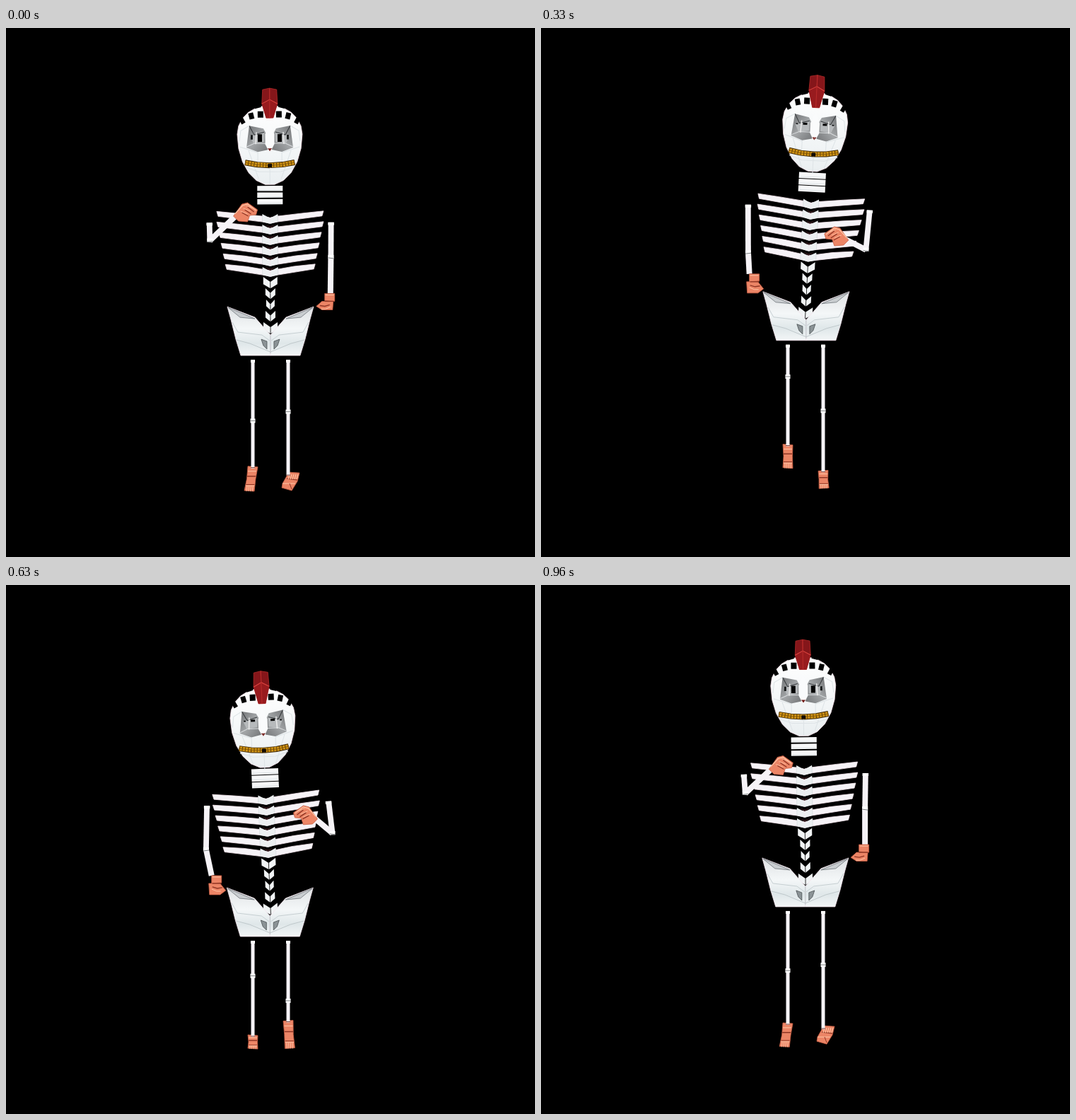
These frames come from a looping animation (748x748 px, 1 s). An HTML page:

```html
<!DOCTYPE html>
<html lang="en">
<head>
<meta charset="utf-8">
<title>Running skeleton</title>
<style>
  html, body { margin: 0; width: 100%; height: 100%; overflow: hidden; background: #000; }
  svg { display: block; width: 100%; height: 100%; }
</style>
</head>
<body>
<svg viewBox="0 0 748 748">
  <defs>
    <linearGradient id="hip" x1="0" x2="0" y1="0" y2="1">
      <stop offset="0" stop-color="#dfe2e4"/><stop offset=".45" stop-color="#f4f7f8"/>
      <stop offset=".75" stop-color="#dfe7e9"/><stop offset="1" stop-color="#f3f6f7"/>
    </linearGradient>
    <linearGradient id="skull" x1="0" x2="0" y1="0" y2="1">
      <stop offset="0" stop-color="#fff"/><stop offset="1" stop-color="#eaeff1"/>
    </linearGradient>
    <linearGradient id="eye" x1="0" x2="1" y1="0" y2="1">
      <stop offset="0" stop-color="#6f7173"/><stop offset=".5" stop-color="#a2a5a7"/>
      <stop offset="1" stop-color="#737577"/>
    </linearGradient>
  </defs>
  <rect width="748" height="748" fill="#000"/>
  <g id="figure"></g>
</svg>
<script>
const figure = document.getElementById('figure');
const MID = 374, GROUND = 463, FRAMES = 24;
const BONE = '#f6f3f7', RIM = '#f3e4ec', FACET = '#dde3e6';
const SKIN = '#ec8566', EDGE = '#c75f45', SHADE = '#8e3524', GLOW = '#ffc6a6';
const { sin, cos, max, min, PI } = Math;

// Sum of harmonics, each given as [cosine, sine] amplitudes
const wave = (mean, ...parts) => a =>
  parts.reduce((sum, [c, s], i) => sum + c * cos((i + 1) * a) + s * sin((i + 1) * a), mean);

const hipY = a => 467 + 30 * sin(2 * a);
const lean = a => 3.3 * sin(a);
const nod = a => min(1, 2 * sin(a) ** 2);

// Left limbs; the right ones are mirrored half a stride later
const upperArm = wave(53, [-12, 0], [-16, 0]);
const elbowX = wave(288, [0, 2.5], [0, -3.3]);
const reachX = wave(16.5, [18, -5.5], [2.5, 0]);
const reachY = wave(8, [-43.5, 2]);
const kneeDrop = wave(77, [15.5, -9.6], [8.5, -3.5], [-7.5, 12]);
const ankleY = wave(618, [-2.4, -18], [8, 8], [-3.6, 2.5]);
const footLength = wave(30, [6, 8]);

const num = v => +v.toFixed(2);
const path = (pts, attrs, close = 'Z') => `<path d="M${pts.map(num).join(' ')}${close}" ${attrs}/>`;
const poly = (pts, fill, stroke = 'none') => path(pts, `fill="${fill}" stroke="${stroke}" stroke-width=".8"`);
const line = (pts, color, width = 1) => path(pts, `fill="none" stroke="${color}" stroke-width="${width}"`, '');
const group = (transform, body) => `<g transform="${transform}">${body}</g>`;
const shift = (x, y, body) => group(`translate(${num(x)} ${num(y)})`, body);
const box = (x, y, w, h, fill) => poly([x, y, x + w, y, x + w, y + h, x, y + h], fill);
const both = body => body + group('translate(748) scale(-1 1)', body);
const repeat = (n, part) => Array.from({ length: n }, (_, i) => part(i)).join('');

const neck = k => repeat(3, i => {
  const y = 223 + i * 9.4;
  return box(356 - k, y, 36 + 2 * k, 7.4 + k, '#f6f7f8') + line([357, y + 6, 391, y + 6], FACET);
});

const ribs = () => repeat(6, i => {
  const y = 259 + i * 15, x = 298.5 + 3 * max(0, i - 1);
  const half = poly([x, y, x + 30, y + 3, 363, y + 7, MID, y + 9, MID, y + 17, 363, y + 15, x + 2, y + 7], BONE, RIM)
    + poly([363, y + 4, MID, y + 10, MID, y + 18, 363, y + 15], '#eceff1')
    + line([363, y + 6, 363, y + 15], '#d5dadd', .7)
    + poly([366, y + 4, MID, y + 6.5, MID, y + 9], i ? '#33191c' : '#000');
  return both(half);
});

const spine = () => both(repeat(5, i => {
  const y = 352 + 16 * i, w = 6 + (i - 2) ** 2, h = 12 + .4 * w, x = MID - w, inner = MID - .4;
  return poly([x, y, inner, y + h * .42, inner, y + h, x, y + h * .64], '#f1f4f5');
}));

function eye(k) {
  const open = 11 - 8 * k;
  return poly([345, 138, 365, 142, 371, 153, 371, 172, 357, 175, 341, 169], 'url(#eye)')
    + poly([346, 152, 366, 148, 366, 161, 351, 163], '#b7babc')
    + line([345, 138, 352, 151, 366, 147], '#34373a')
    + line([341, 168, 352, 163, 368, 163], '#d9dcde')
    + box(357, 150, 6, open, '#050505') + box(347, 151, 3, open * .6, '#181a1b')
    + line([355, 147, 354, 164], '#eee', 1.4);
}

function skull() {
  const outline = Array.from({ length: 22 }, (_, i) => {
    const t = i / 22 * 2 * PI;
    return [MID + 46 * cos(t), 150 + (sin(t) < 0 ? 41 : 72) * sin(t)];
  }).flat();
  const hole = (x, y, w, h, turn) =>
    shift(x, y, group(`rotate(${turn})`, box(-w / 2, -h / 2, w, h, '#000')));
  const holes = repeat(3, i => hole(361 - 13 * i, 122 + 2.2 * i * i, 8 - i, 9, -14 * i))
    + repeat(2, i => hole(357 - 15 * i, 111 + 5 * i, 9, 4, -15 - 15 * i));
  return poly(outline, 'url(#skull)', '#f0dce4') + both(holes);
}

function face(k) {
  const teeth = [339, 190, 356, 193, MID, 194];
  const cheek = line([345, 138, 333, 145, 331, 160], FACET)
    + line([344, 173, 352, 196, 358, 213], FACET)
    + line([332, 168, 357, 176, 357, 189], FACET)
    + line([340, 197, 358, 203, MID, 203], FACET);
  const mouth = line(teeth, '#3c2504', 8) + line(teeth, '#d09415', 6.2)
    + path(teeth, 'fill="none" stroke="#5d3b05" stroke-width="6" stroke-dasharray="1 3.2"', '')
    + line(teeth, '#805406', .8);
  const nose = poly([MID, 134, 367.5, 150, 367.5, 164, 372, 173, MID, 173], '#fafbfc')
    + poly([371, 170, MID, 170, MID, 174], '#6e1815');
  return both(eye(k) + cheek + mouth + nose)
    + box(371, 192, 6, 5, '#120b03') + line([MID, 199, MID, 221], FACET);
}

function crest(k) {
  const low = 127 + 4 * k;
  const half = poly([364, 87, MID, 85, MID, low, 369, low, 363, 107], '#85161a', '#b12a29')
    + poly([363, 107, MID, 101, MID, low, 369, low], '#981b1e')
    + line([363, 107, MID, 101], '#e04742');
  return both(half) + line([MID, 85, MID, low], '#bd2e2d', .8);
}

const head = k => skull() + shift(0, 3 * k, face(k)) + crest(k);

function pelvis() {
  const half = poly([313, 394, 352, 409, MID, 434, MID, 463, 332, 463, 325, 440, 318, 412], 'url(#hip)', RIM)
    + poly([314, 395, 352, 411, 331, 409], '#c9cdd0', '#70777b')
    + line([320, 416, 328, 430, 362, 434, 373, 442], '#c6cfd2')
    + line([326, 441, 345, 446, MID, 458], '#bfc8cb')
    + poly([361, 440, 369, 443, 369, 454, 364, 449], '#8b9396', '#4b5153');
  return both(half) + line([MID, 434, MID, 460], '#bcc5c8');
}

const raisedHand = () =>
  poly([-4, 1, 8, -16, 16, -18, 30, -8, 28, -1, 19, 0, 16, 9, 3, 8], SKIN, EDGE)
  + line([-2, -2, 9, -14, 16, -16, 28, -7], GLOW, 1.2)
  + repeat(3, i => line([8 + 4 * i, -4 - 4 * i, 17 + 4 * i, 1 - 3 * i], SHADE, 1.3)
    + line([6 + 4 * i, -6 - 4 * i, 16 + 4 * i, -2 - 4 * i], GLOW, .8));

const hangingHand = k =>
  poly([-4, 11, -3, 23 + 4 * k, 12, 23 + 4 * k, 20, 18 + 3 * k, 12, 11], SKIN, EDGE)
  + shift(6 * k, 0, poly([-6, 0, 8, 0, 8, 10, -6, 11], SKIN, EDGE)
    + line([-5, 2, 7, 2], GLOW) + line([-5, 11, 8, 11], SHADE, 1.3))
  + line([1, 16, 8, 18, 15, 17], SHADE, 1.4) + line([0, 19, 7, 22, 13, 22], GLOW);

function arm(a, base) {
  const sx = 288 + 5.5 * sin(a), sy = base - 188 - 4.5 * sin(a);
  const ex = elbowX(a), ey = sy + upperArm(a);
  const wx = ex + reachX(a), wy = ey + reachY(a);
  return line([sx, sy, ex, ey], BONE, 7.8) + line([ex, ey, wx, wy], BONE, 8)
    + box(sx - 4.2, sy, 8.5, 4, '#fff') + box(ex - 4, ey - 3, 8, 5.5, '#fff')
    + line([ex - 4, ey + 2, ex + 4, ey + 1], '#55585c', .8)
    + shift(wx, wy, wy < ey ? raisedHand() : hangingHand(nod(a)));
}

const soleUp = () =>
  poly([-16, -1, -1, -2, 8, 14, 9, 20, -5, 24, -13, 11], SKIN, EDGE)
  + line([-13, 9, 2, 7], SHADE, 1.2) + line([-10, 14, 8, 14], GLOW) + line([-5, 22, -2, 14], SHADE)
  + repeat(5, i => line([3 * i - 14, 1, 3 * i - 12, 8], GLOW, 1.1));

function foot(dx, dy) {
  const across = (f, color, width) => line([dx * f - 6, dy * f, dx * f + 6, dy * f], color, width);
  return poly([-7, 0, 7, 1, dx * .5 + 6.5, dy * .5, dx + 7, dy, dx - 7, dy - 1, dx * .5 - 6, dy * .5], SKIN, EDGE)
    + across(.2, GLOW) + across(.4, SHADE, 1.5) + across(.73, SHADE) + across(.78, GLOW)
    + repeat(4, i => line([dx * .8 + 2.7 * i - 4, dy * .8, dx + 2.7 * i - 4, dy], GLOW, .9));
}

function leg(a, base) {
  const x = 349, top = base + 6, knee = base + kneeDrop(a), ankle = ankleY(a);
  const heelStrike = cos(a) < -.9;
  return shift(x, ankle, heelStrike ? soleUp() : foot(-5 * max(0, cos(a)) ** 2, footLength(a)))
    + line([x, top, x, ankle + 3], BONE, 5)
    + box(x - 3, top, 6, 4, '#fff') + box(x - 3.5, knee - 3, 7, 6, '#fff')
    + line([x - 3, knee, x + 3, knee], '#606468', .8)
    + line([x - 3, ankle + 2, x + 3, ankle + 2], '#77413a');
}

function draw(n) {
  // The stride runs a touch fast and catches up at the loop point
  const a = (n * 1.02 - .25) / FRAMES * 2 * PI;
  const base = hipY(a), drop = base - GROUND, k = nod(a), tilt = lean(a);
  const pair = limb => limb(a, base) + group('translate(748) scale(-1 1)', limb(a + PI, base));
  const torso = spine() + ribs() + shift(0, 2.5 * k, neck(k) + head(k));
  figure.innerHTML = pair(leg)
    + shift(0, drop, group(`rotate(${num(tilt)} ${MID} 423)`, torso))
    + shift(tilt * .3, drop, pelvis())
    + pair(arm);
}

let shown = -1;
const start = performance.now();
function tick() {
  const ms = Math.floor((performance.now() - start) % 1000 / 10) * 10;
  const n = Math.floor((ms + 4.9) * FRAMES / 1000) % FRAMES;
  if (n !== shown) draw(shown = n);
  requestAnimationFrame(tick);
}
tick();
</script>
</body>
</html>
```
